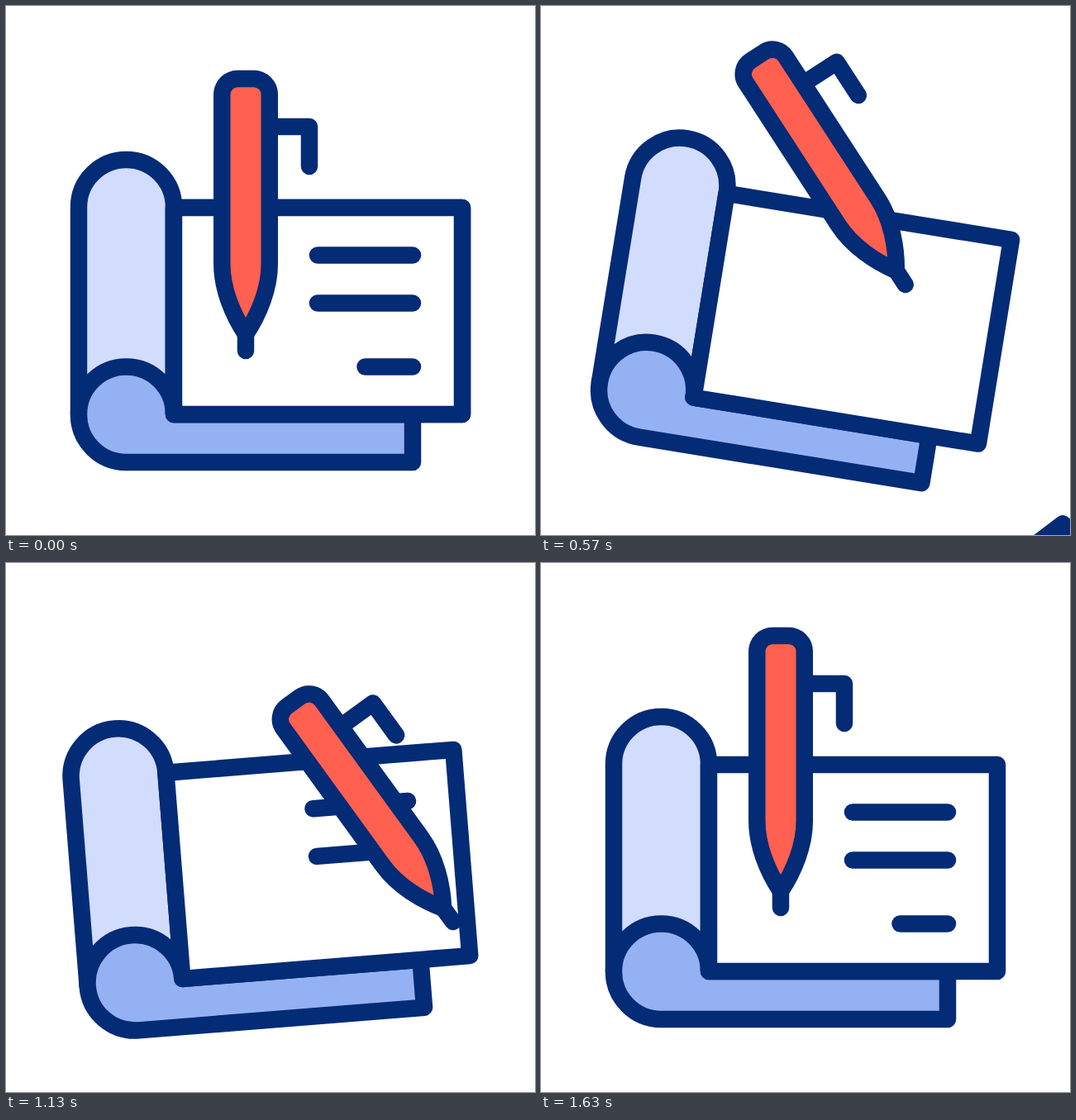
An HTML page that plays this animation: 640 by 640 pixels, repeating every 2000 ms.

```html
<!DOCTYPE html>
<html lang="en">
<head>
<meta charset="utf-8">
<title>Writing a cheque</title>
<style>
  html, body { margin: 0; width: 100%; height: 100%; overflow: hidden; background: #fff; }
  svg { display: block; width: 100%; height: 100%; }
  .ink { stroke: #042b76; stroke-width: 20.5; stroke-linecap: round; stroke-linejoin: round; }
</style>
</head>
<body>
<svg viewBox="0 0 640 640">
  <defs>
    <path id="page" d="M203 244H552V494H203Z" fill="#fff"/>
  </defs>
  <g id="book" class="ink">
    <path d="M203 494V243.5A57.5 57.5 0 0 0 88 243.5V494" fill="#d2dcfd"/>
    <path d="M203 494A57.5 57.5 0 0 0 88 494A57.5 57.5 0 0 0 145.5 552H492V494Z" fill="#94b1f3"/>
    <use href="#page"/>
    <g id="writing"></g>
  </g>
  <g id="sheet" class="ink">
    <use href="#page"/>
    <path d="M377 301.6H492M377 359.4H492M434.5 436.6H492"/>
  </g>
  <g id="pen">
    <path class="ink" d="M319 146H367V194M290 397V417" fill="none"/>
    <path id="barrel" d="M261.3 312V107a19 19 0 0 1 19 -19h19.5a19 19 0 0 1 19 19V312C318.8 342 306 373 290 397C274 373 261.3 342 261.3 312Z" fill="#ff6050"/>
    <path d="M261.3 147V107a19 19 0 0 1 19 -19h19.5a19 19 0 0 1 19 19V147Z" fill="#fecb50"/>
    <use href="#barrel" class="ink" style="fill:none"/>
  </g>
</svg>
<script>
const LOOP = 2000, STEP = 1000 / 30, RAD = Math.PI / 180;
const $ = id => document.getElementById(id);
const book = $('book'), sheet = $('sheet'), pen = $('pen');

// Keys are [tick, ...values]; a tick is 1/30 s.
const bookKeys = [[5.7, 0], [14.5, 12], [27.1, -15], [38, 0]];
const penRest = [314.5, 252.5];
const penKeys = [
  [0, ...penRest, 0],
  [8, 294, 210, -33],
  [13.75, 294, 210, -33],
  [19, 409, 174, -33],
  [23, 420, 193, -33],
  [29, 297, 264, -53.3],
  [35.6, 493, 290.5, -33],
  [49, ...penRest, 0]
];
const lines = [
  { y: 301.6, left: 377, start: 22.7, end: 28.5 },
  { y: 359.4, left: 377, start: 28.6, end: 34 },
  { y: 436.6, left: 434.5, start: 34.2, end: 38 }
];
for (const line of lines) {
  line.path = document.createElementNS('http://www.w3.org/2000/svg', 'path');
  $('writing').append(line.path);
}

function ease(from, to, tick) {
  const p = Math.min(1, Math.max(0, (tick - from) / (to - from)));
  return p * p * (3 - 2 * p);
}

function tween(keys, tick) {
  let i = 0;
  while (i < keys.length - 2 && tick > keys[i + 1][0]) i++;
  const [from, ...a] = keys[i], [to, ...b] = keys[i + 1];
  const s = ease(from, to, tick);
  return a.map((v, k) => v + (b[k] - v) * s);
}

function place(el, dx, dy, angle, cx, cy) {
  el.setAttribute('transform', `translate(${dx} ${dy}) rotate(${angle} ${cx} ${cy})`);
}

// The loose sheet speeds up along a circular arc while turning.
function placeSheet(tick) {
  const u = tick / 8;
  const length = 125 * u ** 2.08;
  const half = 0.0757 * RAD * length;
  const chord = half ? length * Math.sin(half) / half : 0;
  const heading = 15.75 * RAD + half;
  place(sheet, chord * Math.cos(heading), chord * Math.sin(heading), 12.3 * u ** 1.93, 377.5, 369);
  sheet.style.display = tick > 18 ? 'none' : '';
}

function draw(now) {
  const tick = Math.floor((now % LOOP + 4) / STEP);
  place(book, 0, 0, tween(bookKeys, tick)[0], 320, 369);
  placeSheet(tick);
  for (const { path, y, left, start, end } of lines) {
    const x = 492 - (492 - left) * ease(start, end, tick);
    path.setAttribute('d', `M492 ${y}H${x}`);
    path.style.display = tick < start ? 'none' : '';
  }
  const [x, y, angle] = tween(penKeys, tick);
  place(pen, x - penRest[0], y - penRest[1], angle, ...penRest);
}

const begin = performance.now();
function loop() {
  draw(performance.now() - begin);
  requestAnimationFrame(loop);
}
loop();
</script>
</body>
</html>
```
